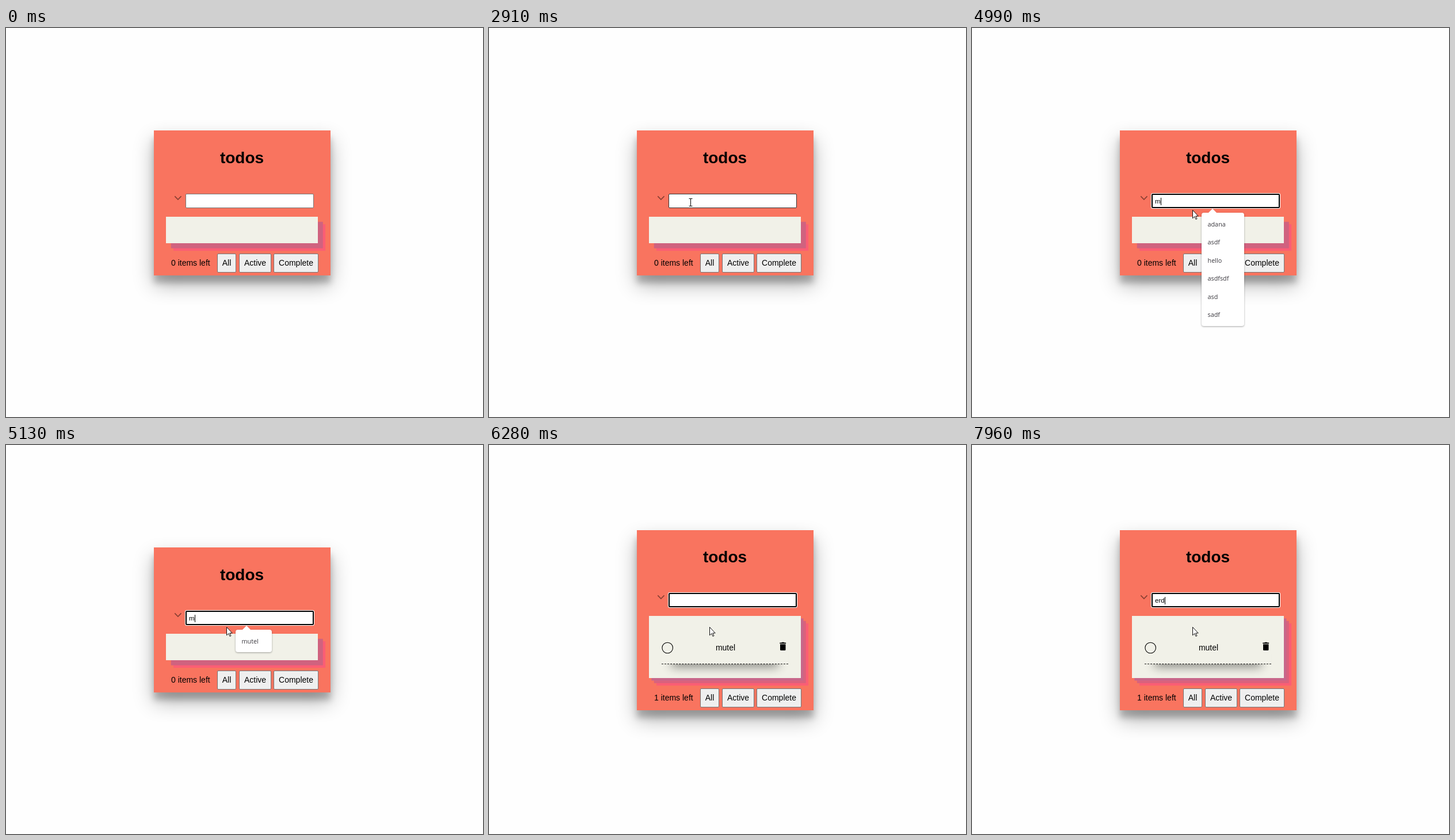
An HTML page for the animation above (8 s loop, 829x676 px).

```html
<!DOCTYPE html>
<html lang="tr">
<head>
<meta charset="utf-8">
<title>todos</title>
<style>
  html, body { margin: 0; width: 100%; height: 100%; overflow: hidden; background: #fefefe; }
  body { font: 14px "Liberation Sans", Arial, sans-serif; color: #000; }
  #stage { position: relative; width: 829px; height: 676px; overflow: hidden; }
  #stage div, #stage svg { position: absolute; top: 0; left: 0; box-sizing: border-box; white-space: pre; }
  #stage svg { overflow: visible; }
  #stage #panel {
    left: 257px; width: 306.5px; background: #f9745f;
    box-shadow: 0 16.6px 33px rgba(0,0,0,.3), 0 13px 10.5px rgba(0,0,0,.22);
  }
  #stage #title { left: 257px; top: 206px; width: 306px; line-height: 40px; text-align: center; font-size: 28px; font-weight: bold; }
  #stage #field {
    left: 312px; top: 288px; width: 223px; height: 25px; padding-left: 5px;
    line-height: 23px; font-size: 11.67px; background: #fff; border: 1px solid #767676; border-radius: 2px;
  }
  #stage #field.hover { border-color: #333; }
  #stage #field.focus { border: 2px solid #000; padding-left: 4px; line-height: 21px; box-shadow: 0 0 0 1px #fff; }
  #caret { display: inline-block; width: 1px; height: 13px; margin-right: -1px; vertical-align: -3px; background: #000; }
  #stage #list { left: 278.4px; width: 263.5px; background: #f1f1e8; box-shadow: 8.8px 8.8px #d0627f, 13.1px 13.1px #fb5e74; }
  #stage #list.full { box-shadow: 4.4px 4.4px #c8678a, 8.8px 8.8px #d9627c, 13.1px 13.1px #fb5e74; }
  #stage #item { left: 300px; top: 323px; width: 220px; height: 58px; border-bottom: 1px dashed #000; box-shadow: 0 22px 17.5px -17.5px rgba(0,0,0,.45); }
  #stage #item div { width: 222px; top: 19px; line-height: 20px; text-align: center; }
  #stage #foot div { height: 33px; line-height: 32px; }
  #stage #foot .btn { line-height: 31px; text-align: center; background: #efefef; border: 1px solid #767676; border-radius: 2px; }
  #stage #popup {
    left: 399px; top: 321px; padding: 3.5px 0 4px 10.5px; background: #fff; border-radius: 4px;
    box-shadow: 0 1px 3px rgba(0,0,0,.35); font: 10.8px/31.5px "Open Sans", "Noto Sans", sans-serif; color: #3a383e;
  }
  #popup span { display: block; height: 31.5px; }
  #popup::before { content: ""; position: absolute; left: 12px; top: -7px; border: 7px solid transparent; border-top: 0; border-bottom-color: #fff; }
</style>
</head>
<body>
<div id="stage">
  <div id="panel"></div>
  <div id="top">
    <div id="title">todos</div>
    <svg width="829" height="676"><path d="M293.3 292.4l5.6 5.6 5.6-5.6" fill="none" stroke="#873f32" stroke-width="1.6"/></svg>
    <div id="field"><span id="typed"></span><span id="caret"></span></div>
  </div>
  <div id="list"></div>
  <div id="item">
    <svg width="220" height="58">
      <circle cx="10.2" cy="29.5" r="9.3" fill="none" stroke="#000" stroke-width="1.1"/>
      <path d="M205.3 20.6h3l.8-.9h3.6l.8.9h2.6v1.7h-10.8zM206 23.2h9.5v9.2q0 1.5-1.5 1.5h-6.5q-1.5 0-1.5-1.5z"/>
    </svg>
    <div>mutel</div>
  </div>
  <div id="foot">
    <div id="count" style="left:287px"></div>
    <div class="btn" style="left:367px;width:33px">All</div>
    <div class="btn" style="left:405px;width:56px">Active</div>
    <div class="btn" style="left:465px;width:78px">Complete</div>
  </div>
  <div id="popup"></div>
  <svg id="cursor" width="829" height="676">
    <path id="arrow" d="M.5.5v14.2l3.3-3.1 2.2 4.9 2-.9-2.2-4.7h4.4z" fill="#fff" stroke="#111" stroke-width="1"/>
    <path id="beam" d="M-3-6.5h2.2q.8 0 .8.8 0-.8.8-.8h2.2M0-6v12M-3 6.5h2.2q.8 0 .8-.8 0 .8.8.8h2.2" fill="none" stroke="#111" stroke-width="1.1"/>
  </svg>
</div>
<script>
const LOOP = 8000, STEP = 69, START = 730;
const $ = id => document.getElementById(id);

// pointer path: time, x, y
const path = [
  [730, 784, 551], [900, 690, 470], [1070, 555, 385], [1230, 440, 319], [1350, 410, 305],
  [1490, 382, 300], [1550, 375, 300], [1750, 375, 300], [1850, 377, 285], [1970, 386, 264],
  [2080, 380, 276], [2270, 366, 302], [2480, 341, 311], [2680, 350, 311], [2850, 350.5, 303],
  [2980, 350.5, 303], [3120, 348, 304], [3200, 350, 304], [3350, 383, 316]
];

const words = ["adana", "asdf", "hello", "asdfsdf", "asd", "sadf"];
const typing = [
  [0, ""], [4990, "m"], [5200, "mu"], [5400, "mut"], [5530, "mute"], [5730, "mutel"],
  [6280, ""], [7680, "e"], [7820, "er"], [7960, "erd"]
];
const blinks = [
  [0, 0], [3200, 1], [3670, 0], [4200, 1], [4730, 0], [4990, 1],
  [6280, 0], [6810, 1], [7340, 0], [7680, 1]
];
const popups = [
  [0, null, 0], [3200, words, .3], [3270, words, .65], [3340, words, 1],
  [5060, ["mutel"], 1], [5730, ["mutel"], .75], [5800, ["mutel"], .4], [5870, ["mutel"], .15], [5930, null, 0],
  [7750, ["elma"], .6], [7820, ["elma"], .4], [7890, ["elma"], .15], [7960, null, 0]
];

const at = (keys, t) => keys.filter(k => k[0] <= t).pop();

function pointer(t) {
  const i = path.findIndex(p => p[0] > t);
  if (i < 0) return path[path.length - 1].slice(1);
  const [t0, x0, y0] = path[i - 1], [t1, x1, y1] = path[i];
  const k = (t - t0) / (t1 - t0);
  return [x0 + (x1 - x0) * k, y0 + (y1 - y0) * k];
}

function box(id, top, bottom) {
  $(id).style.top = top + "px";
  $(id).style.height = bottom - top + "px";
}

const show = (id, on) => { $(id).style.display = on ? "" : "none"; };

let shown;
function drawPopup(t, lift) {
  const [, rows, alpha] = at(popups, t);
  show("popup", rows);
  if (!rows) return;
  if (rows !== shown) {
    $("popup").innerHTML = rows.map(w => `<span>${w}</span>`).join("");
    shown = rows;
  }
  $("popup").style.width = (rows === words ? 73.5 : 63) + "px";
  $("popup").style.opacity = alpha;
  $("popup").style.transform = `translateY(${-lift}px)`;
}

function drawCursor(t) {
  show("cursor", t >= START);
  if (t < START) return false;
  const [x, y] = pointer(START + Math.floor((t - START) / STEP) * STEP);
  const over = x > 312 && x < 535 && y > 287 && y < 313;
  show("beam", over);
  show("arrow", !over);
  $(over ? "beam" : "arrow").setAttribute("transform", `translate(${x} ${y})`);
  return over;
}

function render(t) {
  const added = t >= 6280, lift = added ? 31 : 0;
  box("panel", added ? 147.5 : 178, added ? 460.5 : 430);
  box("list", added ? 297 : 328, added ? 404.5 : 374);
  $("list").className = added ? "full" : "";
  $("top").style.top = -lift + "px";
  $("foot").style.top = 392 + lift + "px";
  $("count").textContent = `${+added} items left`;
  show("item", added);
  const over = drawCursor(t);
  $("field").className = t >= 3200 ? "focus" : over ? "hover" : "";
  $("typed").textContent = at(typing, t)[1];
  show("caret", at(blinks, t)[1]);
  drawPopup(t, lift);
}

const begin = performance.now();
function tick() {
  render((performance.now() - begin) % LOOP);
  requestAnimationFrame(tick);
}
tick();
</script>
</body>
</html>
```
